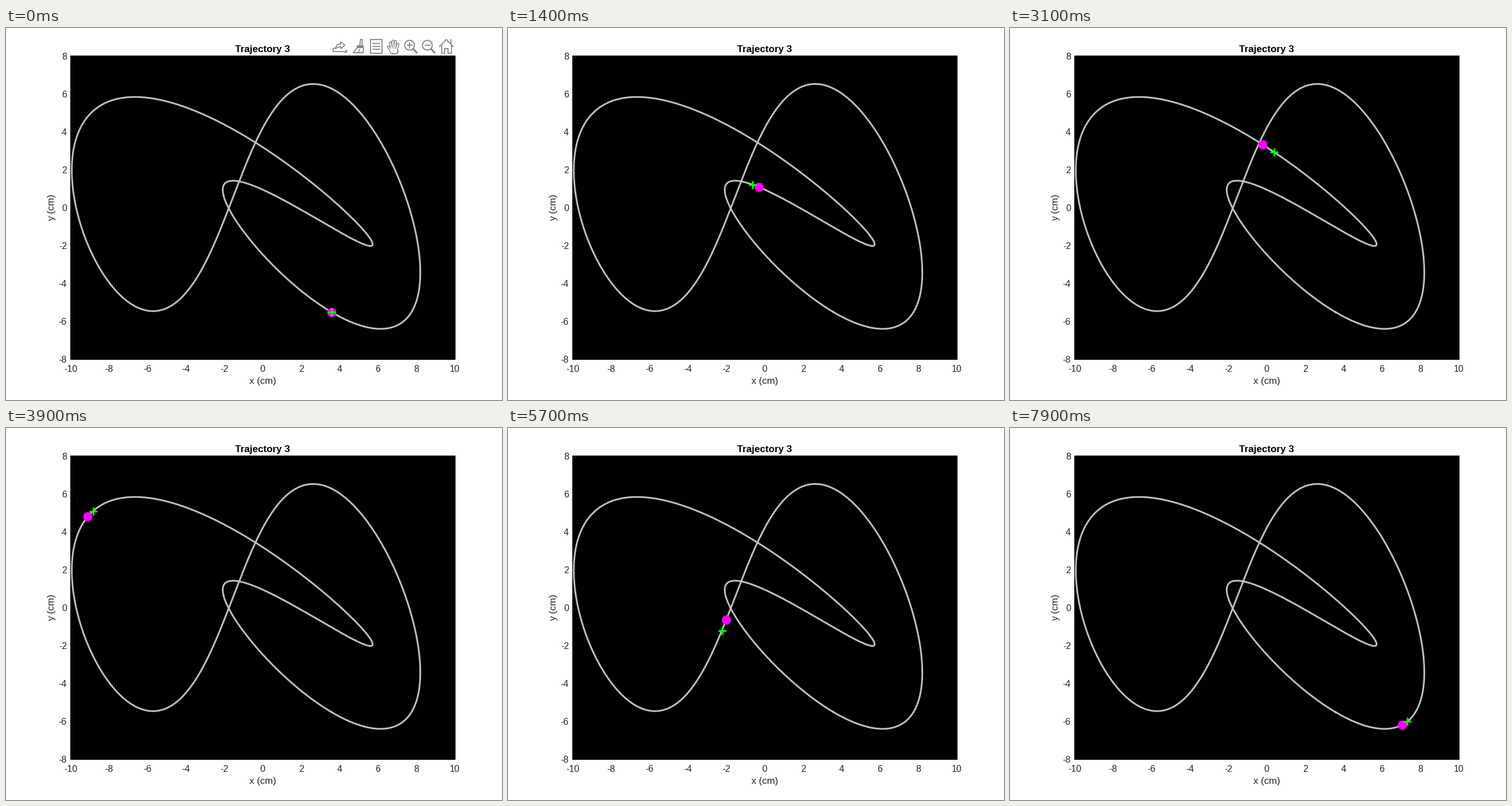
Recreate the animation shown at these times as a matplotlib script. Size 864 by 648 pixels, loop 8000 ms.

```python
import numpy as np
import matplotlib.pyplot as plt
from matplotlib.animation import FuncAnimation
from matplotlib.patches import Circle, Polygon, Rectangle

W, H, DPI = 864, 648, 100
FRAMES, STEP = 80, 0.1
PT = 72 / DPI                           # points per pixel
CX, CY = 447.3, 312.8                   # data origin in pixels
UX, UY = 33.48, 33.0                    # pixels per cm
INK, GREY = "#262626", "#858585"

plt.rcParams["font.family"] = "Liberation Sans"


def path(deg):
    """Sum of three harmonics, each swinging along its own direction."""
    a = np.radians(deg)
    x = y = 0
    for k, size, phase, heading in ((1, 5.67, 0, -15), (2, -5.2, -45, 30),
                                    (3, 5.1, 60, -60)):
        swing = size * np.cos(k * a + np.radians(phase))
        x = x + swing * np.cos(np.radians(heading))
        y = y + swing * np.sin(np.radians(heading))
    return CX + UX * x, CY - UY * y


def phase_at(t):
    """Degrees along the loop: a short wait, then constant speed."""
    return 43.9 * max(0, t - 0.11)


def lag(t):
    """Delay of the follower: slow to react, then close behind."""
    return 0.046 + 0.4 * np.exp(-4 * t)


fig = plt.figure(figsize=(W / DPI, H / DPI), dpi=DPI, facecolor="white")
ax = fig.add_axes([0, 0, 1, 1])
ax.set(xlim=(0, W), ylim=(H, 0))
ax.axis("off")
ax.add_patch(Rectangle((112, 48), 671, 530, color="black", lw=0))


def label(x, y, text, size=16, **kw):
    style = dict(ha="center", va="baseline", color=INK, fontsize=size * PT)
    ax.text(x, y, text, **{**style, **kw})


for v in range(-10, 11, 2):
    label(CX + v * UX, 599, str(v))
for v in range(-8, 9, 2):
    label(106, CY - v * UY + 5.8, str(v), ha="right")
label(CX, 42.3, "Trajectory 3", 17, weight="bold", color="black")
label(CX, 620, "x (cm)", 16.7)
label(84, CY, "y (cm)", 16.7, rotation=90, rotation_mode="anchor")

ax.plot(*path(np.linspace(0, 360, 1200)), color="#bfbfbf", lw=3 * PT)
dot, = ax.plot([], [], "o", color="#ff00ff", ms=16 * PT, mew=0)
cross, = ax.plot([], [], "+", color="#00ff00", ms=14 * PT, mew=3 * PT)

# Toolbar icons
tools = []


def stroke(*pts, lw=1.8, color=GREY):
    tools.extend(ax.plot(*zip(*pts), color=color, lw=lw * PT,
                         solid_joinstyle="round", solid_capstyle="round"))


def solid(*pts):
    tools.append(ax.add_patch(Polygon(pts, color=GREY, lw=0)))


def share(x, y):
    stroke((x - 11, y + 3), (x - 11, y + 9), (x + 7, y + 9))
    stroke((x - 8, y + 4), (x - 4, y - 3), (x + 2, y - 4), (x + 2, y - 8),
           (x + 9, y - 2), (x + 2, y + 4), (x + 2, y), (x - 8, y + 4))
    solid((x + 13, y + 5), (x + 13, y + 11), (x + 7, y + 11))


def brush(x, y):
    stroke((x + 2, y), (x + 3.5, y - 12), (x + 6.5, y - 12), (x + 6, y))
    solid((x - 3, y - 2), (x + 9, y - 2), (x + 9, y + 3), (x - 3, y + 3))
    stroke((x - 3, y + 3), (x - 9, y + 11), (x + 8, y + 11), (x + 9, y + 3))
    stroke((x, y + 10), (x + 2, y + 5))


def note(x, y):
    tools.append(ax.add_patch(Rectangle((x - 10, y - 12), 20, 24, fill=False,
                                        ec=GREY, lw=1.8 * PT)))
    for dy in (-5, 0, 5):
        stroke((x - 6, y + dy), (x + 6, y + dy))


def hand(x, y):
    # Grey limbs with narrower white ones on top leave an outline.
    for grow, color in ((0, GREY), (-3, "white")):
        stroke((x - 2, y + 8), (x + 3, y + 8), lw=11 + grow, color=color)
        stroke((x - 3, y + 8), (x - 9, y + 1), lw=5 + grow, color=color)
        for k in range(4):
            tip = (x - 5.5 + 4.5 * k, y - 9.5 + 2 * (k - 1.3) ** 2)
            stroke(tip, (x - 3 + 2.5 * k, y + 6), lw=5 + grow, color=color)


def lens(x, y, plus):
    tools.append(ax.add_patch(
        Circle((x, y), 8.5, fill=False, ec=GREY, lw=1.9 * PT)))
    stroke((x + 6.5, y + 6.5), (x + 12.5, y + 13), lw=3)
    stroke((x - 4.5, y), (x + 4.5, y))
    if plus:
        stroke((x, y - 4.5), (x, y + 4.5))


def home(x, y):
    stroke((x - 12, y + 0.5), (x, y - 12), (x + 12, y + 0.5))
    stroke((x - 8.5, y - 2), (x - 8.5, y + 12), (x - 3, y + 12),
           (x - 3, y + 4), (x + 3, y + 4), (x + 3, y + 12),
           (x + 8.5, y + 12), (x + 8.5, y - 2))
    stroke((x + 7.5, y - 12), (x + 7.5, y - 5))


share(581, 32)
brush(614, 32)
note(645, 32)
hand(675, 32)
lens(703, 30, True)
lens(734, 30, False)
home(767, 32)


def draw(n):
    t = n * STEP
    for mark, when in ((dot, t), (cross, t - lag(t))):
        x, y = path(phase_at(when))
        mark.set_data([x], [y])
    for art in tools:
        art.set_visible(n == 0)
    return [dot, cross, *tools]


anim = FuncAnimation(fig, draw, frames=FRAMES, interval=STEP * 1000,
                     repeat=True, repeat_delay=0, blit=False)
plt.show()
```
